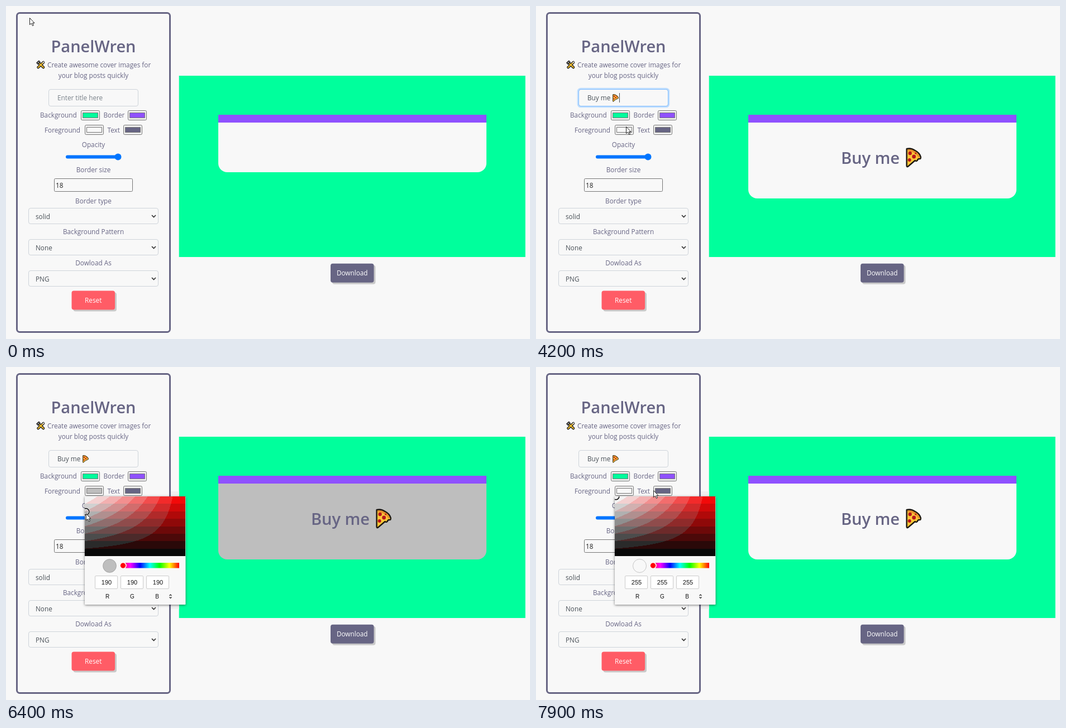
An HTML page with a canvas that plays this animation: 938x597 px, repeating every 8000 ms.

```html
<!DOCTYPE html>
<html lang="en">
<head>
<meta charset="utf-8">
<title>Cover maker</title>
<style>
html, body { margin: 0; width: 100%; height: 100%; overflow: hidden; background: #f8f8f8; }
canvas { display: block; }
</style>
</head>
<body>
<canvas id="stage" width="938" height="597"></canvas>
<script>
const LOOP = 8000, INK = '#676584', PAPER = '#f8f8f8', GREEN = '#00ff9c', PURPLE = '#8f51ff';
const SANS = '"Open Sans", "Noto Sans", sans-serif';
const BODY = `11.75px ${SANS}`, HEADING = `600 29px ${SANS}`;
const DIGITS = '11px "Liberation Sans", sans-serif', TINY = '10px "Liberation Sans", sans-serif';
const ctx = document.getElementById('stage').getContext('2d');

// Motion: [time, value...], linear between keys
const cursorIn = [[0, 42, 21], [100, 85, 95]];
const cursorPath = [[3900, 165, 190], [4200, 161, 216], [4600, 158, 221], [5300, 158, 221], [5900, 143, 234],
  [6100, 143, 240], [6300, 143, 258], [6900, 142, 285], [7000, 142, 288], [7200, 142, 283],
  [7500, 143, 240], [7600, 152, 231], [7900, 210, 221]];
const grayPath = [[6100, 248], [6200, 230], [6300, 207], [6600, 155], [6900, 112], [7000, 106], [7200, 116], [7500, 240], [7600, 255]];
const focusPath = [[700, 0], [900, 1], [4900, 1], [5000, .4], [5100, 0]];
const typing = [[1500, 'B'], [1700, 'Bu'], [1800, 'Buy'], [2100, 'Buy '], [2300, 'Buy m'], [2400, 'Buy me'], [2600, 'Buy me ']];

function at(keys, t) {
  const i = keys.findIndex(k => k[0] > t);
  if (i < 0) return keys[keys.length - 1].slice(1);
  if (i === 0) return keys[0].slice(1);
  const a = keys[i - 1], b = keys[i], p = (t - a[0]) / (b[0] - a[0]);
  return a.slice(1).map((v, j) => v + (b[j + 1] - v) * p);
}

const between = (t, a, b) => t >= a && t < b;

function paint(fill, stroke, width = 1) {
  if (fill) { ctx.fillStyle = fill; ctx.fill(); }
  if (stroke) { ctx.strokeStyle = stroke; ctx.lineWidth = width; ctx.stroke(); }
}

function box(x, y, w, h, r, fill, stroke, width) {
  ctx.beginPath();
  ctx.roundRect(x, y, w, h, r);
  paint(fill, stroke, width);
}

function disc(x, y, r, fill, stroke, width) {
  ctx.beginPath();
  ctx.arc(x, y, r, 0, 7);
  paint(fill, stroke, width);
}

function line(color, width, ...pts) {
  ctx.beginPath();
  for (let i = 0; i < pts.length; i += 2) ctx.lineTo(pts[i], pts[i + 1]);
  paint(null, color, width);
}

function text(s, x, y, color = INK, align = 'left', font = BODY) {
  ctx.font = font;
  ctx.textAlign = align;
  ctx.fillStyle = color;
  ctx.fillText(s, x, y);
}

const centered = (s, y, font) => text(s, 156.5, y, INK, 'center', font);

function widthOf(s, font) {
  ctx.font = font;
  return ctx.measureText(s).width;
}

function swatch(x, y, color) {
  box(x + .5, y + .5, 33, 17, 2, '#efefef', '#767676');
  box(x + 3.5, y + 4.5, 27, 9, 0, color, '#777');
}

function select(y, value) {
  box(40.5, y + .5, 232, 28, 3.5, PAPER, '#ced4da');
  text(value, 53, y + 20, '#495057');
  line('#333', 1.7, 261, y + 13, 264.5, y + 16.5, 268, y + 13);
}

function button(x, y, color, label) {
  box(x + 3, y + 3, 77.5, 34, 4, '#c9c9c9');
  box(x, y, 77.5, 34, 4, color);
  text(label, x + 38.7, y + 21.5, '#fff', 'center');
}

function tools() {
  ctx.lineCap = 'round';
  for (const [color, w] of [['#1d1d1d', 4.6], ['#f5c02c', 2]]) {
    line(color, w, 58, 101.5, 67, 110);
    line(color, w, 67, 101, 57.5, 110);
  }
  ctx.lineCap = 'butt';
  line('#1d1d1d', 4.5, 55.5, 103.5, 60.5, 99);
  line('#bbb', 1.5, 56.5, 102.5, 59.5, 100);
  line('#ddd', 1.8, 65.5, 102.5, 68, 100);
}

// Slice in a 29 by 36 unit box
const slice = new Path2D('M2 2Q10 0 17 5Q25 9 27 16Q28 21 24 20Q22 20 21 23Q19 25 17 23L4 34Q2 35 2 32Z');
const crust = new Path2D('M4 4Q19 5 25 17');

function pizza(x, y, scale) {
  ctx.save();
  ctx.translate(x, y);
  ctx.scale(scale, scale);
  ctx.lineJoin = 'round';
  ctx.fillStyle = '#fbc638';
  ctx.fill(slice);
  ctx.strokeStyle = '#e8902b';
  ctx.lineWidth = 4;
  ctx.stroke(crust);
  for (const [cx, cy, r] of [[8, 10, 3.2], [15, 16, 3.4], [7, 22, 3], [18, 10, 1.5]]) disc(cx, cy, r, '#b8141c');
  ctx.strokeStyle = '#1c1710';
  ctx.lineWidth = 2.4;
  ctx.stroke(slice);
  ctx.restore();
}

function arrow(x, y) {
  ctx.save();
  ctx.translate(x + .5, y + .5);
  ctx.beginPath();
  [[0, 0], [0, 12], [3, 9.5], [5, 14], [7, 13], [5, 9], [8.5, 9]].forEach(p => ctx.lineTo(...p));
  ctx.closePath();
  paint('#fff', '#222');
  ctx.restore();
}

// Red shade field reduced to eight levels per channel
const field = document.createElement('canvas');
field.width = 180;
field.height = 107;
const fieldCtx = field.getContext('2d');
const level = v => Math.min(7, Math.floor(v * 8)) * 33.4 + 9;
for (let y = 0; y < 107; y++) {
  for (let x = 0; x < 180; x++) {
    const v = 1 - (y + .5) / 107, g = level(v * (1 - (x + .5) / 180));
    fieldCtx.fillStyle = `rgb(${level(v)},${g},${g})`;
    fieldCtx.fillRect(x, y, 1, 1);
  }
}

const hues = ctx.createLinearGradient(205, 0, 310, 0);
for (let i = 0; i <= 6; i++) hues.addColorStop(i / 6, `hsl(${360 - i * 60},100%,50%)`);

function titleField(t, value, hasPizza) {
  const [focus] = at(focusPath, t);
  box(76.5, 149.5, 160, 30, 3.5, PAPER, '#ced4da');
  if (focus) {
    ctx.globalAlpha = focus;
    box(75, 148, 163, 33, 5, null, '#bfdeff', 2.6);
    ctx.globalAlpha = Math.min(1, focus * 2);
    box(76.5, 149.5, 160, 30, 3.5, null, '#80bdff');
    ctx.globalAlpha = 1;
  }
  if (value) text(value, 92, 169, '#495057');
  else text('Enter title here', 92, 169, '#7a828a');
  let caret = 92 + widthOf(value, BODY);
  if (hasPizza) {
    pizza(caret + .5, 158, .39);
    caret += 13;
  }
  if (between(t, 700, 1200) || between(t, 1500, 3500) || between(t, 4000, 4500)) {
    ctx.fillStyle = '#495057';
    ctx.fillRect(Math.round(caret), 156, 1, 17);
  }
}

function panel(t, value, hasPizza, shade) {
  box(19.5, 12.5, 274, 572, 5, null, INK, 3);
  centered('PanelWren', 83, HEADING);
  tools();
  text('Create awesome cover images for', 74, 110);
  centered('your blog posts quickly', 129);
  titleField(t, value, hasPizza);

  text('Background', 61, 200);
  swatch(134, 187, GREEN);
  text('Border', 174.5, 200);
  swatch(218, 187, PURPLE);
  text('Foreground', 69, 227);
  swatch(141, 213, shade);
  text('Text', 181.5, 227);
  swatch(210, 213, INK);
  centered('Opacity', 253);
  box(107, 267.5, 99, 6, 3, '#0075ff');
  disc(200.5, 270.5, 6, '#0075ff');
  centered('Border size', 298);
  box(86.5, 309.5, 140, 23, 2, PAPER, '#767676');
  text('18', 89, 326, '#222');
  centered('Border type', 354);
  select(362, 'solid');
  centered('Background Pattern', 409);
  select(418, 'None');
  centered('Dowload As', 465);
  select(474, 'PNG');
  button(117.5, 510.5, '#ff5c66', 'Reset');
}

function cover(value, hasPizza, shade) {
  ctx.fillStyle = GREEN;
  ctx.fillRect(309.7, 125, 620, 325);
  box(380, 195, 480, value ? 150 : 103, [0, 0, 16, 16], shade);
  ctx.fillStyle = PURPLE;
  ctx.fillRect(380, 195, 480, 14);
  const label = hasPizza ? value : value.trim();
  const w = widthOf(label, HEADING), left = 619.5 - (w + (hasPizza ? 34.5 : 0)) / 2;
  text(label, left, 283, INK, 'left', HEADING);
  if (hasPizza) pizza(left + w + 3, 254, 1);
  button(581, 461.7, INK, 'Download');
}

function picker(gray, shade) {
  ctx.fillStyle = '#f0f0f0';
  ctx.fillRect(295, 223, 14.7, 211);
  ctx.save();
  ctx.shadowColor = 'rgba(0,0,0,.5)';
  ctx.shadowBlur = 4;
  ctx.shadowOffsetY = 1;
  box(141, 232, 180.5, 194, 1, PAPER);
  ctx.restore();
  ctx.drawImage(field, 141, 232);

  ctx.save();
  ctx.beginPath();
  ctx.rect(141, 232, 180, 194);
  ctx.clip();
  const y = 232 + (255 - gray) / 255 * 107;
  disc(143, y, 5.5, null, '#fff', 3);
  disc(143, y, 5.8, null, '#111', 1.6);
  ctx.restore();

  disc(185.5, 356.5, 12, shade, 'rgba(0,0,0,.2)');
  ctx.fillStyle = hues;
  ctx.fillRect(205, 351, 105, 9.5);
  disc(209.5, 356, 5.5, '#f00', '#fff', 1.5);
  ['R', 'G', 'B'].forEach((name, i) => {
    box(159.5 + 46 * i, 374.5, 40, 23, 1.5, '#fff', '#ccc');
    text(Math.round(gray), 180 + 46 * i, 390, '#111', 'center', DIGITS);
    text(name, 181.5 + 44.5 * i, 415, '#111', 'center', TINY);
  });
  line('#222', 1.1, 292.5, 410, 294.5, 408, 296.5, 410);
  line('#222', 1.1, 292.5, 412.5, 294.5, 414.5, 296.5, 412.5);
}

function draw(t) {
  const typed = typing.filter(k => k[0] <= t).pop();
  const value = typed ? typed[1] : '';
  const hasPizza = t >= 3000;
  const [gray] = at(grayPath, t);
  const tone = Math.min(248, Math.round(gray));
  const shade = `rgb(${tone},${tone},${tone})`;

  ctx.fillStyle = PAPER;
  ctx.fillRect(0, 0, 938, 597);
  panel(t, value, hasPizza, shade);
  cover(value, hasPizza, shade);
  if (t >= 5300) picker(gray, shade);
  if (t < 200) arrow(...at(cursorIn, t));
  else if (t >= 3900) arrow(...at(cursorPath, t));
}

let start;
function frame(now) {
  start ??= now;
  draw(Math.floor((now - start) % LOOP / 100) * 100);
  requestAnimationFrame(frame);
}
requestAnimationFrame(frame);
</script>
</body>
</html>
```
